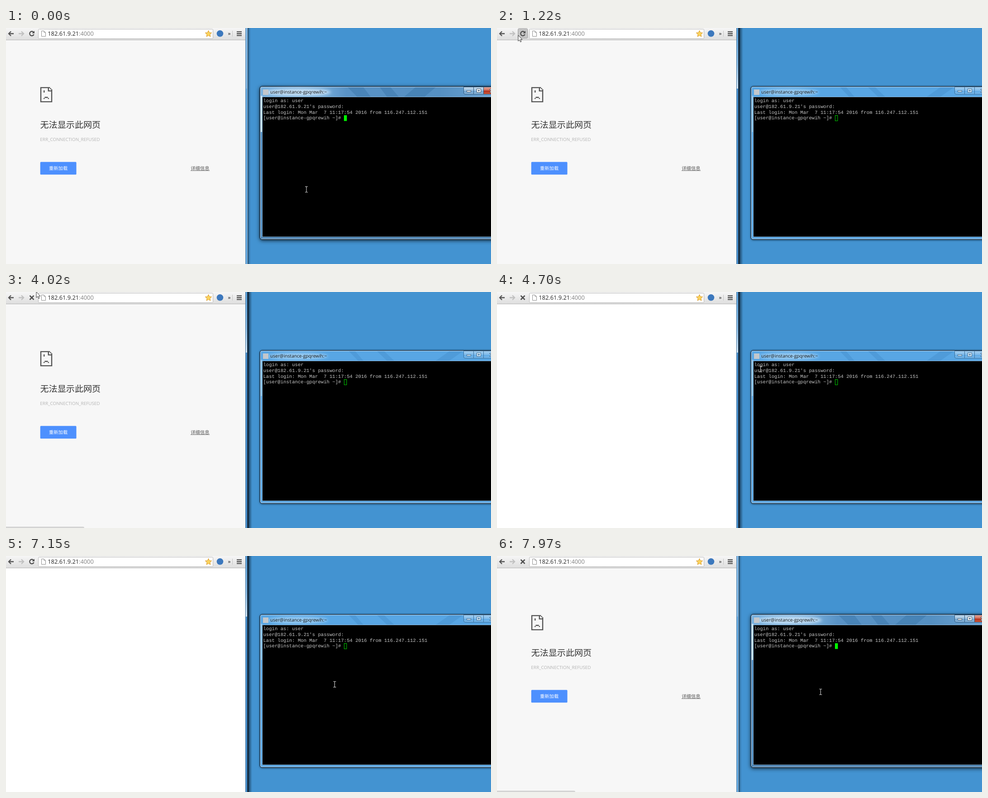
Write an HTML page that moves like this. It is 1072x522 px and loops after 8000 ms.

```html
<!DOCTYPE html>
<html lang="zh-CN">
<head>
<meta charset="utf-8">
<title>Reload</title>
<style>
html, body { margin: 0; width: 100%; height: 100%; overflow: hidden; background: #4393d1; }
svg { display: block; width: 1072px; height: 522px; }
text { text-rendering: geometricPrecision; white-space: pre; }
.ui { font-family: "Open Sans", "Noto Sans", sans-serif; }
.cjk { font-family: "Noto Sans CJK SC", "Noto Sans CJK", sans-serif; }
.term { font: 10.62px "Liberation Mono", monospace; fill: #c6c6c6; }
.deep { filter: drop-shadow(0 0 1.5px #000b) drop-shadow(0 2px 4px #000a); }
.soft { filter: drop-shadow(0 0 1px #0009) drop-shadow(0 1px 2px #0007); }
</style>
</head>
<body>
<svg viewBox="0 0 1072 522">
  <defs>
    <linearGradient id="bar" x2="0" y2="1"><stop stop-color="#f6f6f6"/><stop offset="1" stop-color="#dedede"/></linearGradient>
    <linearGradient id="edge" x2="0" y2="1"><stop stop-color="#5aa2dc"/><stop offset=".6" stop-color="#8cc0ea"/><stop offset="1" stop-color="#d8ebfa"/></linearGradient>
    <linearGradient id="shade"><stop stop-color="#081522" stop-opacity=".9"/><stop offset=".35" stop-color="#0c2438" stop-opacity=".5"/><stop offset="1" stop-color="#0c2438" stop-opacity="0"/></linearGradient>
    <linearGradient id="focus"><stop stop-color="#78b0de"/><stop offset=".25" stop-color="#78aedb"/><stop offset=".36" stop-color="#5993c6"/><stop offset=".75" stop-color="#5590c2"/><stop offset="1" stop-color="#6fa6d4"/></linearGradient>
    <linearGradient id="gloss" x2="0" y2="1"><stop stop-color="#fff" stop-opacity=".65"/><stop offset=".5" stop-color="#fff" stop-opacity=".35"/><stop offset=".52" stop-color="#fff" stop-opacity=".08"/><stop offset="1" stop-color="#fff" stop-opacity=".25"/></linearGradient>
    <linearGradient id="red" x2="0" y2="1"><stop stop-color="#e5a698"/><stop offset=".48" stop-color="#cf6b58"/><stop offset=".52" stop-color="#b5301c"/><stop offset="1" stop-color="#cc5a3c"/></linearGradient>
    <filter id="blur" x="-20%" y="-60%" width="140%" height="220%"><feGaussianBlur stdDeviation="3"/></filter>
  </defs>
  <rect width="1072" height="522" fill="#4393d1"/>

  <g id="edgeIdle">
    <rect x="529" width="5" height="522" fill="#5c86aa"/>
    <rect x="530" width="3" height="134" fill="#7db5e4"/>
    <rect x="530" y="134" width="3" height="388" fill="#5fa5de"/>
    <rect x="533" width="1" height="522" fill="#a4cdec"/>
    <rect x="534" width="1" height="522" fill="#1d3a54"/>
    <rect x="535" width="6" height="522" fill="url(#shade)" opacity=".5"/>
  </g>
  <g id="edgeFocus">
    <rect x="529" width="5" height="522" fill="#3f6f9a"/>
    <rect x="530" width="3" height="134" fill="url(#edge)"/>
    <rect x="530" y="134" width="3" height="388" fill="#4a92d0"/>
    <rect x="533.5" width="1.5" height="522" fill="#0c1a28"/>
    <rect x="535" width="9" height="522" fill="url(#shade)"/>
  </g>

  <g id="page">
    <rect y="27" width="529" height="495" fill="#f7f7f7"/>
    <g transform="translate(75.8 130.7) scale(2.4)" fill="#535353">
      <path d="M0 0H9V1H8V3H11V14H0ZM1 1V13H10V4H7V1Z" fill-rule="evenodd"/>
      <path d="M9 1h1v1H9ZM10 2h1v1H10ZM3 3h1v2H3ZM4 9h3v1H4ZM3 10h1v1H3ZM7 10h1v1H7Z"/>
    </g>
    <text class="cjk" x="75.5" y="221" font-size="19.1" fill="#333">无法显示此网页</text>
    <text class="ui" x="75.3" y="250.3" font-size="9.89" fill="#b4b4b4">ERR_CONNECTION_REFUSED</text>
    <rect x="75.7" y="296.3" width="79.8" height="28" rx="1.6" fill="#4d90fe"/>
    <text class="cjk" x="95" y="314.2" font-size="10.3" fill="#fff">重新加载</text>
    <text class="cjk" x="408.3" y="314.2" font-size="10.3" fill="#555">详细信息</text>
    <rect x="408" y="315" width="42" height="1" fill="#666"/>
  </g>
  <rect id="blank" y="27" width="529" height="495" fill="#fff"/>
  <path id="status" d="M0 519H170Q173 519 173 522H0Z" fill="#d4d4d4"/>

  <rect width="529" height="26" fill="url(#bar)"/>
  <rect y="26" width="529" height="1" fill="#b4b4b4"/>
  <rect id="btn" x="46.5" y="1.5" width="21" height="21" rx="2"/>
  <g fill="none" stroke-width="2.3">
    <path d="M17 12.5H6M11 7.5 6 12.5 11 17.5" stroke="#555"/>
    <path d="M28 12.5H39M34 7.5 39 12.5 34 17.5" stroke="#c0c0c0"/>
    <g id="reload"><path d="M60.8 9.2A4.8 4.8 0 1 0 61.6 14" stroke="#505050"/><path d="M63 6.2V11.8H57.4Z" fill="#505050"/></g>
    <path id="stop" d="M52.5 8 61.5 17M61.5 8 52.5 17" stroke="#505050" stroke-width="2.5"/>
    <path d="M510 8.3H521M510 12.5H521M510 16.7H521" stroke="#505050"/>
  </g>
  <rect x="71.5" y="2.5" width="386" height="21" rx="2" fill="#fff" stroke="#b6b6b6"/>
  <path d="M78.5 6.5H84L87.5 10V18.5H78.5ZM84 6.5V10H87.5" fill="#fff" stroke="#8e8e8e"/>
  <text class="ui" x="92.3" y="17.4" font-size="12.8" fill="#222">182.61.9.21<tspan fill="#808080">:4000</tspan></text>
  <path id="star" fill="#fbd45c" stroke="#d9992b" stroke-linejoin="round"/>
  <circle cx="473" cy="12.3" r="7.3" fill="#3c78bd"/>
  <text class="ui" x="490.5" y="16" font-size="11" font-weight="600" fill="#444">»</text>
  <rect x="500" y="6" width="1" height="13" fill="#c2c2c2"/>

  <g id="win">
    <rect id="frame" x="561.5" y="129.5" width="531" height="338" rx="4.5" stroke="#16293c"/>
    <rect x="562.5" y="130.5" width="529" height="336" rx="3.5" fill="none" stroke="#d4e8f8" stroke-opacity=".85"/>
    <g id="winFocus">
      <path d="M755 131H790L806 152H776ZM826 131H850L868 152H842ZM905 131H950L925 152H880Z" fill="#2f6a9e" opacity=".35"/>
      <rect x="563" y="150" width="4" height="80" fill="#c4e0f5"/>
      <rect x="563" y="230" width="4" height="236" fill="#4d8abf"/>
      <rect x="563" y="462" width="509" height="4" fill="#4a80b0"/>
      <ellipse cx="646" cy="142" rx="72" ry="8.5" fill="#cfe6f8" opacity=".85" filter="url(#blur)"/>
    </g>
    <g id="winIdle">
      <path d="M758 131H772L790 152H778ZM820 131H836L858 152H842ZM980 131H1010L980 152H950Z" fill="#3f86c4" opacity=".35"/>
      <rect x="563" y="150" width="4" height="80" fill="#86c0ee"/>
      <ellipse cx="645" cy="142" rx="66" ry="7.5" fill="#a9d5f6" opacity=".8" filter="url(#blur)"/>
    </g>
    <rect x="566.5" y="152.5" width="520" height="309.5" fill="#000" stroke="#86b2d6"/>
    <rect x="568" y="136" width="12" height="12" fill="#c3c7cc"/>
    <text class="ui" x="584" y="145.2" font-size="10.15" fill="#111">user@instance-gpqrewih:~</text>
    <g id="buttons" stroke="#2c587e">
      <path d="M1011.5 130.5H1080V146.5H1015Q1011.5 146.5 1011.5 143Z" fill="url(#gloss)"/>
      <path d="M1033.5 131V146M1055.5 131V146" fill="none"/>
      <rect id="close" x="1056" y="131" width="30" height="15" fill="url(#red)" stroke="none"/>
      <g fill="#fff" stroke="#45596c"><rect x="1018.5" y="138.5" width="9" height="3"/><path d="M1040.5 134.5H1049.5V142.5H1040.5ZM1043.5 137.5V139.5H1046.5V137.5Z" fill-rule="evenodd"/><path d="M1068.5 135.5H1072L1076 139 1072 142.5H1068.5L1072 139Z"/></g>
    </g>
    <g id="lines" class="term"></g>
    <rect id="caret"/>
  </g>

  <path id="beam" d="M-3 -6.3H-1L0 -5.5 1 -6.3H3M0 -5.5V5.5M-3 6.3H-1L0 5.5 1 6.3H3" fill="none" stroke="#d8d8d8" stroke-width="1.1"/>
  <path id="arrow" d="M0 0V13L3 10.3 5 15 7 14.1 5 9.6H9Z" fill="#fff" stroke="#222" stroke-width=".9"/>
</svg>
<script>
const $ = id => document.getElementById(id);
const show = (id, on) => { $(id).style.display = on ? "" : "none"; };
const set = (id, attrs) => { for (const k in attrs) $(id).setAttribute(k, attrs[k]); };

const lines = [
  "login as: user",
  "user@182.61.9.21's password:",
  "Last login: Mon Mar  7 11:17:54 2016 from 116.247.112.151",
  "[user@instance-gpqrewih ~]# "
];
$("lines").innerHTML = lines.map((s, i) => `<text x="568.5" y="${164 + i * 12.75}">${s}</text>`).join("");

set("star", { d: "M" + Array.from({ length: 10 }, (_, i) => {
  const r = i % 2 ? 3.5 : 7.5, a = (i / 5 - .5) * Math.PI;
  return (447.5 + r * Math.cos(a)).toFixed(1) + " " + (13 + r * Math.sin(a)).toFixed(1);
}).join("L") + "Z" });

// Pointer positions held between n evenly spaced times.
function glide(t0, t1, n, [x0, y0], [x1, y1]) {
  return Array.from({ length: n }, (_, i) => {
    const p = (i + 1) / n, e = p * p * (3 - 2 * p);
    return [t0 + (t1 - t0) * i / (n - 1), { x: x0 + (x1 - x0) * e, y: y0 + (y1 - y0) * e }];
  });
}

const LOOP = 8000;
const steps = [
  [0, { x: 664, y: 357, focus: true, blank: false, loading: false, status: false, btn: "none" }],
  ...glide(120, 960, 7, [664, 357], [48, 4]),
  [1100, { x: 46, y: 15 }],
  [1220, { x: 46.8, y: 16, focus: false, btn: "down" }],
  [1360, { x: 49.3 }],
  [1490, { btn: "hover" }],
  [1800, { loading: true, status: true }],
  [2230, { btn: "fade" }],
  [2360, { btn: "none" }],
  [2770, { loading: false, status: false, btn: "hover" }],
  [3050, { btn: "down" }],
  [3180, { btn: "hover" }],
  [3450, { loading: true, status: true }],
  [3590, { btn: "fade" }],
  [3720, { btn: "none" }],
  [3870, { x: 62, y: 8 }],
  [4020, { x: 67, y: -.5 }],
  ...glide(4160, 4850, 6, [67, 0], [763, 230]),
  [4436, { blank: true, status: false }],
  [6410, { x: 758.3, y: 236, loading: false }],
  ...glide(6575, 7400, 6, [758.3, 236], [715.3, 300.5]),
  [7550, { loading: true, status: true }],
  [7680, { blank: false }],
  [7970, { focus: true }]
].sort((a, b) => a[0] - b[0]);

const buttonLooks = {
  none: ["none", "none"],
  fade: ["#ebebeb", "#d2d2d2"],
  hover: ["#f0f0f0", "#b2b2b2"],
  down: ["#c6c6c6", "#989898"]
};

function draw(t) {
  const s = {};
  for (const [at, change] of steps) if (t >= at) Object.assign(s, change);
  const beam = s.x > 567 && s.y > 153 && s.y < 462;
  for (const id of ["winFocus", "edgeIdle", "close"]) show(id, s.focus);
  for (const id of ["winIdle", "edgeFocus"]) show(id, !s.focus);
  show("blank", s.blank);
  show("status", s.status);
  show("reload", !s.loading);
  show("stop", s.loading);
  show("beam", beam);
  show("arrow", !beam);
  set(beam ? "beam" : "arrow", { transform: `translate(${s.x} ${s.y})` });
  set("frame", { fill: s.focus ? "url(#focus)" : "#58a6e4", class: s.focus ? "deep" : "soft" });
  set("buttons", { opacity: s.focus ? 1 : .7 });
  const [fill, stroke] = buttonLooks[s.btn];
  set("btn", { fill, stroke });
  set("caret", s.focus
    ? { x: 747, y: 193, width: 6.4, height: 12.6, fill: "#0f0", stroke: "none" }
    : { x: 747.5, y: 193.5, width: 5.4, height: 11.8, fill: "none", stroke: "#00d000" });
}

const start = performance.now();
function tick() {
  draw((performance.now() - start) % LOOP);
  requestAnimationFrame(tick);
}
tick();
</script>
</body>
</html>
```
